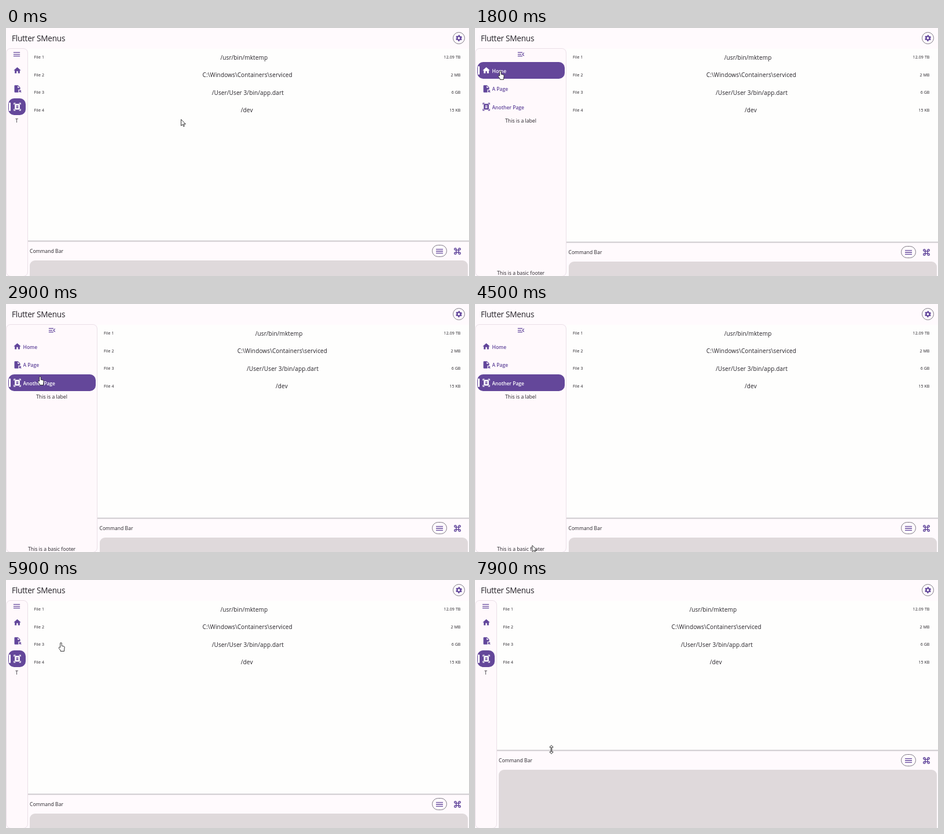
Animation of 800 by 430 pixels, one loop 8000 ms. Source, as an HTML page:

```html
<!DOCTYPE html>
<html lang="en">
<head>
<meta charset="utf-8">
<title>Flutter SMenus</title>
<style>
  html, body { margin: 0; width: 100%; height: 100%; overflow: hidden; }
  body { background: #fffafd; color: #242127; font-family: "Open Sans", "Noto Sans", sans-serif; }
  #stage { position: relative; width: 800px; height: 430px; overflow: hidden; --w: 37.5px; --d: 370px; }
  #stage * { box-sizing: border-box; }
  #stage div, #stage svg { position: absolute; }
  svg { display: block; fill: #62469b; fill-rule: evenodd; overflow: visible; }
  .title { left: 10px; top: 8px; font-size: 13.6px; line-height: 20px; letter-spacing: -.25px; white-space: nowrap; }
  .ring { border: 1px solid #7d7783; border-radius: 11px; }

  #side { left: 0; top: 35px; width: var(--w); height: 396px; border: 1px solid #eadfe7; border-radius: 8px; background: #fff9fc; }
  #pill { left: calc(var(--w) / 2); top: 35px; width: min(35px, var(--w) - 6px); height: 21px; border-radius: 10.5px;
    transform: translateX(-50%); }
  #pill.hover { background: #dfd6e9; }
  #toggle { left: calc(var(--w) / 2 - 7.5px); top: 38px; }
  .item { left: 3.5px; width: calc(var(--w) - 7px); height: 29px; border-radius: 10px; overflow: hidden;
    color: #62469b; font-size: 8.5px; font-weight: 600; line-height: 14px; }
  .item svg { left: 8px; top: 7px; }
  .item .name { left: 26px; right: 2px; top: 8.5px; height: 14px; overflow: hidden; }
  .item .mark { left: 1.5px; top: 7px; width: 3px; height: 15px; border-radius: 2px; }
  .item .ripple { border-radius: 50%; background: #62469b14; transform: translate(-50%, -50%); }
  .item.hover { background: #ede8f4; }
  .item.on { background: #64479a; color: #fff; }
  .item.on svg { fill: #fff; }
  .item.on .mark { background: #fff; }
  .note { left: 0; width: var(--w); padding: 0 15px; height: 14px; overflow: hidden; text-align: center;
    font-size: 8.7px; line-height: 14px; overflow-wrap: anywhere; }

  #list { left: var(--w); right: 0; top: 36px; height: calc(var(--d) - 36px); background: #fefefd; }
  .row { left: 11px; right: 14.5px; height: 20px; display: flex; justify-content: space-between; align-items: center;
    font-size: 7px; letter-spacing: .1px; white-space: nowrap; }
  .row b { font-weight: 400; font-size: 10px; letter-spacing: .12px; }
  #bar { left: var(--w); right: 0; top: calc(var(--d) + 1px); bottom: 0; background: #fffafd; }
  #bar .edge { left: 0; right: 0; top: -2px; height: 2px; background: #cecace; transform: translateY(-.5px); }
  #bar .cap { left: 3.5px; top: 8px; font-size: 8.5px; line-height: 16px; letter-spacing: .05px; white-space: nowrap; }
  #bar .panel { left: 3.5px; right: 2.5px; top: 31.5px; height: 420px; border-radius: 9px; background: #dfd9db; }
  #cursor { left: 0; top: 0; width: 1px; height: 1px; fill: #fff; stroke: #222; stroke-width: .9; stroke-linejoin: round; }
</style>
</head>
<body>
<div id="stage">
  <div class="title">Flutter SMenus</div>
  <div class="ring" style="left:772px;top:6.5px;width:21px;height:21px"></div>
  <svg style="left:776px;top:10.5px" width="13" height="13" viewBox="0 0 24 24">
    <g fill="none" stroke="#62469b">
      <circle cx="12" cy="12" r="5.5" stroke-width="4"/>
      <circle cx="12" cy="12" r="8.4" stroke-width="3.4" pathLength="12" stroke-dasharray="1.1 .9" stroke-dashoffset="-.45"/>
    </g>
  </svg>

  <div id="list"></div>
  <div id="bar">
    <div class="edge"></div>
    <div class="cap">Command Bar</div>
    <div class="ring" style="right:38px;top:5px;width:26px;height:21px"></div>
    <svg style="right:43px;top:7.5px" width="16" height="16" viewBox="0 0 24 24"><path d="M3 18h18v-2H3v2zm0-5h18v-2H3v2zm0-7v2h18V6H3z"/></svg>
    <svg style="right:12.5px;top:7.5px" width="16" height="16" viewBox="0 0 24 24"><path fill="none" stroke="#62469b" stroke-width="2.2"
      d="M9 9V6.5A2.5 2.5 0 1 0 6.5 9h11A2.5 2.5 0 1 0 15 6.5v11a2.5 2.5 0 1 0 2.5-2.5h-11A2.5 2.5 0 1 0 9 17.5V9"/></svg>
    <div class="panel"></div>
  </div>

  <div id="side"></div>
  <div id="pill"></div>
  <svg id="toggle" width="15" height="15" viewBox="0 0 24 24"><path/></svg>
  <div id="items"></div>
  <div class="note" style="top:154px">This is a label</div>
  <div class="note" id="footer" style="top:417.5px">This is a basic footer</div>
  <svg id="cursor"><path/></svg>
</div>

<script>
const $ = id => document.getElementById(id);
const LOOP = 8000, STEP = 100, NARROW = 37.5, WIDE = 158;

const MENU = 'M3 18h18v-2H3v2zm0-5h18v-2H3v2zm0-7v2h18V6H3z';
const MENU_OPEN = 'M3 18h13v-2H3v2zm0-5h10v-2H3v2zm0-7v2h13V6H3zm18 9.59L17.42 12 21 8.41 19.59 7l-5 5 5 5L21 15.59z';
const POINTERS = {
  arrow: 'M0 0v11l2.6-2.4 1.7 3.7 1.6-.7-1.6-3.6h3.5z',
  hand: 'M-1.3 8V1A1.3 1.3 0 0 1 1.3 1V5.2L5 6Q6.3 6.4 6.2 8L5.6 12V14.5H-.8V13L-3.6 9.4Q-4.2 8-3 7.4Z',
  resize: 'M0-7.5L3.2-4H.8V4H3.2L0 7.5-3.2 4H-.8V-4H-3.2Z'
};

const items = [
  { name: 'Home', top: 59, icon: 'M10 20v-6h4v6h5v-8h3L12 3 2 12h3v8z' },
  { name: 'A Page', top: 90.6, icon: 'M14 2H6C4.9 2 4 2.9 4 4v16c0 1.1.89 2 2 2H15v-8h5V8zM13 9V3.5L18.5 9zM17 21.66V16h5.66v2h-2.24l2.95 2.95-1.41 1.41L19 19.41v2.24z' },
  { name: 'Another Page', top: 122.2, icon: 'M7 3H4v3H2V1h5zm15 3V1h-5v2h3v3zM7 21H4v-3H2v5h5zm13-3v3h-3v2h5v-5zM19 18c0 1.1-.9 2-2 2H7c-1.1 0-2-.9-2-2V6c0-1.1.9-2 2-2h10c1.1 0 2 .9 2 2zM15 8H9v2h6zm0 3H9v2h6zm0 3H9v2h6z' }
];
// item, press time, time it becomes selected
const clicks = [[0, 1700, 1800], [1, 2100, 2300], [2, 2700, 2800]];
// time, x, y of the pointer tip
const path = [
  [0, 302.5, 158.5], [900, 17, 44], [1200, 17.5, 43.5], [1700, 44, 74], [1800, 44, 75], [2100, 54.5, 104],
  [2300, 54.5, 104], [2700, 59, 126], [2900, 59, 126], [3600, 48, 162], [4500, 99, 418.5], [5200, 78, 46],
  [5400, 78, 46], [5900, 95, 109], [6300, 97, 131], [6600, 124, 360], [6800, 132, 370], [7500, 132, 370]
];

for (const it of items) {
  it.el = document.createElement('div');
  it.el.style.top = it.top + 'px';
  it.el.innerHTML = `<div class="ripple"></div><div class="mark"></div>
    <svg width="15" height="15" viewBox="0 0 24 24"><path d="${it.icon}"/></svg><div class="name">${it.name}</div>`;
  it.ripple = it.el.querySelector('.ripple');
  it.label = it.el.querySelector('.name');
  $('items').append(it.el);
}
[['/usr/bin/mktemp', '12.09 TB'], ['C:\\Windows\\Containers\\serviced', '2 MB'],
 ['/User/User 3/bin/app.dart', '6 GB'], ['/dev', '15 KB']].forEach(([file, size], i) => {
  const row = document.createElement('div');
  row.className = 'row';
  row.style.top = 4.8 + i * 30.4 + 'px';
  row.innerHTML = `<span>File ${i + 1}</span><b>${file}</b><span>${size}</span>`;
  $('list').append(row);
});

const ramp = (t, a, b) => Math.min(1, Math.max(0, (t - a) / (b - a)));

function pointerAt(t) {
  if (t >= 7500) return [132, 370 - 76 * ramp(t, 7500, 7900)];
  const i = path.findIndex(k => k[0] > t), [a, x, y] = path[i - 1], [b, u, v] = path[i];
  const p = ramp(t, a, b), e = p * p * (3 - 2 * p);
  return [x + (u - x) * e, y + (v - y) * e];
}

function draw(t) {
  const [x, y] = pointerAt(t);
  const w = NARROW + (WIDE - NARROW) * (ramp(t, 1100, 1400) - ramp(t, 5300, 5600));
  const split = t < 1000 ? 370 : t < 7500 ? 372 : y + 2;
  $('stage').style.setProperty('--w', w + 'px');
  $('stage').style.setProperty('--d', split + 'px');

  $('toggle').firstChild.setAttribute('d', t > 1100 && t < 5300 ? MENU_OPEN : MENU);
  $('pill').className = y > 35 && y < 56 && Math.abs(x - w / 2) < 23 ? 'hover' : '';
  $('footer').style.visibility = w > 45 ? 'visible' : 'hidden';

  const last = clicks.filter(c => t >= c[2]).pop();
  const selected = last ? last[0] : 2;
  items.forEach((it, i) => {
    const over = x > 3.5 && x < w - 3.5 && y > it.top && y < it.top + 29;
    it.el.className = 'item' + (i === selected ? ' on' : over ? ' hover' : '');
    it.label.style.visibility = w > 50 ? 'visible' : 'hidden';
    const press = clicks.find(c => c[0] === i && t >= c[1] && t < c[2]);
    const size = press ? (t - press[1]) * .48 : 0;
    Object.assign(it.ripple.style, { width: size + 'px', height: size + 'px', left: x - 3.5 + 'px', top: y - it.top + 'px' });
  });

  const kind = t >= 6700 ? 'resize' : (t >= 900 && t <= 3200) || (t >= 4900 && t <= 5900) ? 'hand' : 'arrow';
  $('cursor').firstChild.setAttribute('d', POINTERS[kind]);
  $('cursor').style.transform = `translate(${x}px, ${y}px)`;
}

function tick(now) {
  draw(Math.floor((now % LOOP) / STEP) * STEP);
  requestAnimationFrame(tick);
}
draw(0);
requestAnimationFrame(tick);
</script>
</body>
</html>
```
